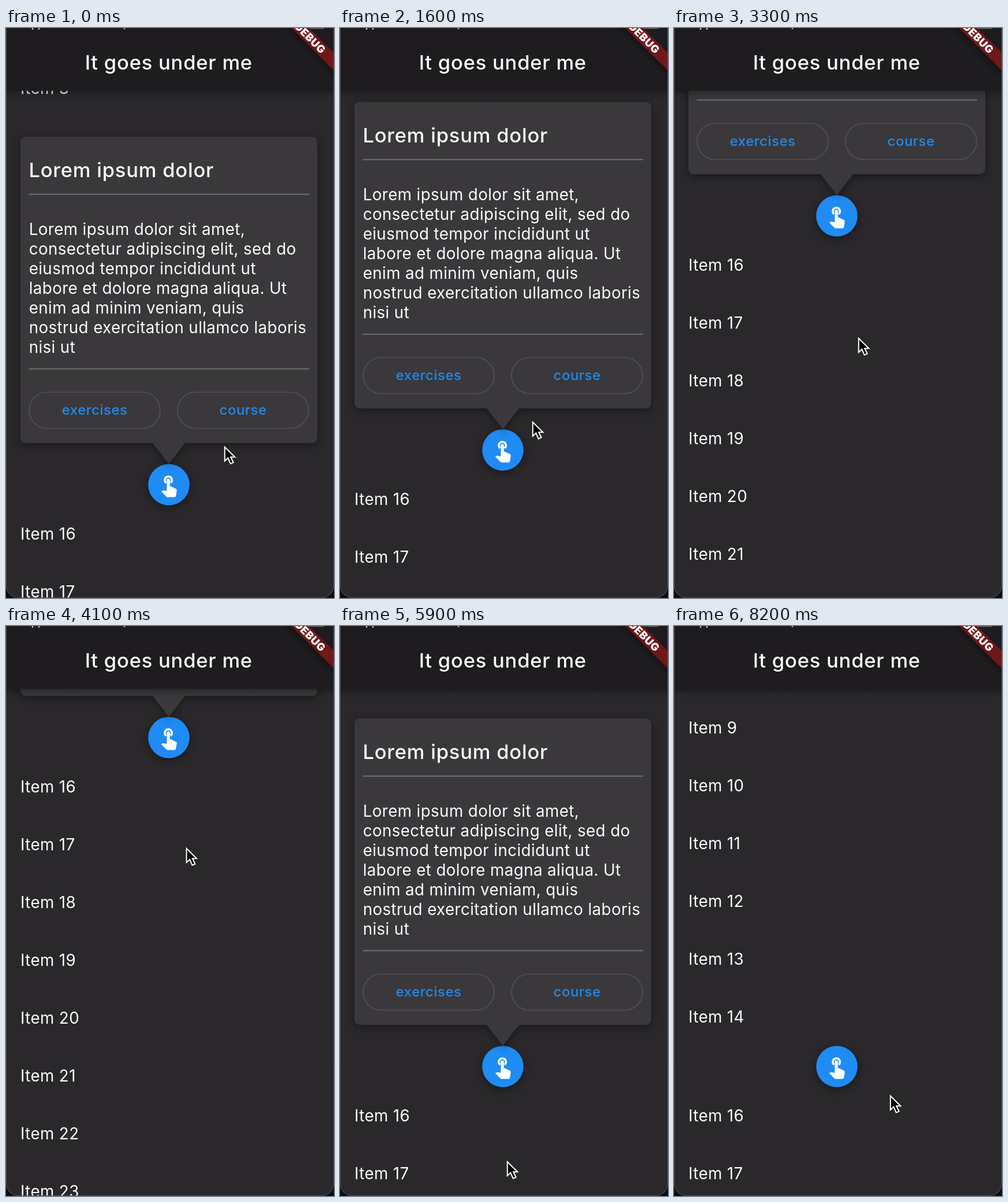
These frames come from a looping animation (568x986 px, 8400 ms). An HTML page:

```html
<!DOCTYPE html>
<html lang="en">
<head>
<meta charset="utf-8">
<title>Popup under app bar</title>
<style>
  html, body { margin: 0; width: 100%; height: 100%; overflow: hidden; background: #0c0b0d; }
  svg { display: block; width: 100%; height: 100%; }
  text { font-family: Inter, Roboto, sans-serif; font-optical-sizing: none; fill: #fbfafc; white-space: pre; }
  .body { font-size: 27.8px; letter-spacing: .36px; }
  .head { font-size: 34.6px; font-weight: 500; letter-spacing: .75px; }
  .action { font-size: 24px; font-weight: 500; letter-spacing: .5px; fill: #208aee; text-anchor: middle; }
  .debug { font-size: 18.5px; font-weight: 900; letter-spacing: .5px; text-anchor: end; }
  .shade { filter: drop-shadow(0 4px 7px rgba(0, 0, 0, .4)); }
</style>
</head>
<body>
<svg viewBox="0 0 568 986">
  <defs>
    <clipPath id="window"><rect y="-40" width="568" height="1026" rx="21"/></clipPath>
    <linearGradient id="fall" x2="0" y2="1">
      <stop stop-opacity=".3"/>
      <stop offset=".4" stop-opacity=".11"/>
      <stop offset="1" stop-opacity="0"/>
    </linearGradient>
  </defs>
  <g clip-path="url(#window)">
    <rect width="568" height="986" fill="#2a282b"/>

    <!-- the list is laid out around the centre of its round button -->
    <g id="list">
      <g id="items"></g>
      <circle class="shade" cx="282" r="35.8" fill="#1f8bf4"/>
      <g transform="translate(260.6 -21.4) scale(1.786)">
        <path d="M9.3 10.2A3.5 3.5 0 1 1 13.7 10.2" fill="none" stroke="#fff" stroke-width="2"/>
        <path d="M10 18.2V7.5a1.5 1.5 0 0 1 3 0v6h.8l5 2.4q1 .5 .9 1.6l-.8 5.2q-.2 1.3-1.4 1.3h-6.8q-.6 0-1.1-.5l-4.9-4.9 .8-.8q.5-.5 1-.3z" fill="#fff"/>
      </g>
      <g id="popup">
        <g class="shade" fill="#3a383b">
          <rect x="25" y="-602" width="514" height="530" rx="9"/>
          <path d="M253 -73H311L282 -36Z"/>
        </g>
        <text class="head" x="39.4" y="-532.4">Lorem ipsum dolor</text>
        <g id="copy"></g>
        <path d="M39.5 -502.3H525M39.5 -200.3H525" stroke="#757476" stroke-width="1.8"/>
        <g id="actions"></g>
      </g>
    </g>

    <rect y="108" width="568" height="17" fill="url(#fall)"/>
    <rect width="568" height="108.5" fill="#1e1c1f"/>
    <path d="M46 0V3M57 0V3M205 0V2" stroke="#bbb" stroke-width="2.4"/>
    <path d="M523 .5H551" stroke="#777" stroke-width="1.4"/>
    <text class="head" x="281.8" y="71.6" text-anchor="middle">It goes under me</text>
    <g transform="translate(509.5 0) rotate(45)">
      <rect class="shade" x="-40" y="-10.7" width="180" height="21.4" fill="#6f1719"/>
      <text class="debug" x="58" y="6.6">DEBUG</text>
    </g>
    <rect x=".5" y="-40" width="567" height="1025.5" rx="21" fill="none" stroke="#504f52" stroke-width="1.1"/>
  </g>
  <path id="cursor" d="M.8 1.8V26L6.4 20.8 10.8 30.6 15.6 28.6 11.2 19.2H18.4Z" stroke="#fff" stroke-width="2"/>
</svg>
<script>
const LOOP = 8400, STEP = 100;
const ROW = 100, BUTTON_ROW = 15;
const CLOSE = 6500, FADE = 200;
const $ = id => document.getElementById(id);

// list: height of the button; x, y: tip of the cursor
const rest = { list: 790, x: 378, y: 723 };
const moves = [
  { from: 300, to: 1600, list: 730, x: 333, y: 680 },
  { from: 1600, to: 2500, list: 440, x: 320, y: 417 },
  { from: 2500, to: 3300, list: 325, x: 319, y: 535 },
  { from: 3300, to: 4300, list: 179, x: 311, y: 367 },
  { from: 5000, to: 5800, list: 762, x: 289, y: 925 },
  { from: 6200, to: CLOSE, x: 287, y: 772 },
  { from: 6900, to: 7200, x: 374, y: 811 }
];

function add(parent, tag, attrs, words = "") {
  const el = document.createElementNS("http://www.w3.org/2000/svg", tag);
  for (const key in attrs) el.setAttribute(key, attrs[key]);
  el.textContent = words;
  parent.append(el);
}

function build() {
  for (let n = 8; n <= 24; n++) {
    const row = n - BUTTON_ROW;
    // the button's row is lower than the others, which draws its neighbours in
    const y = row * ROW - 14.5 * Math.sign(row) + 9.8;
    if (row) add($("items"), "text", { class: "body", x: 25, y }, "Item " + n);
  }

  const copy = `Lorem ipsum dolor sit amet,
consectetur adipiscing elit, sed do
eiusmod tempor incididunt ut
labore et dolore magna aliqua. Ut
enim ad minim veniam, quis
nostrud exercitation ullamco laboris
nisi ut`;
  copy.split("\n").forEach((line, i) =>
    add($("copy"), "text", { class: "body", x: 39.7, y: -432.5 + i * 34 }, line));

  ["exercises", "course"].forEach((label, i) => {
    const x = 40 + i * 257;
    add($("actions"), "rect", { x, y: -160, width: 227, height: 62.5, rx: 31.2, fill: "none", stroke: "#514f52", "stroke-width": 1.7 });
    add($("actions"), "text", { class: "action", x: x + 113.6, y: -121.2 }, label);
  });
}

const clamp = u => Math.min(1, Math.max(0, u));
const ease = u => (1 - Math.cos(Math.PI * u)) / 2;

function poseAt(t) {
  const pose = { ...rest };
  for (const { from, to, ...goal } of moves) {
    const u = ease(clamp((t - from) / (to - from)));
    for (const key in goal) pose[key] += (goal[key] - pose[key]) * u;
  }
  return pose;
}

function draw(t) {
  const { list, x, y } = poseAt(t);
  $("list").setAttribute("transform", `translate(0 ${list})`);
  $("cursor").setAttribute("transform", `translate(${x} ${y})`);
  $("popup").setAttribute("opacity", 1 - clamp((t - CLOSE) / FADE));
}

const start = performance.now();
function tick() {
  const t = (performance.now() - start) % LOOP;
  draw(Math.floor(t / STEP) * STEP);
  requestAnimationFrame(tick);
}
build();
tick();
</script>
</body>
</html>
```
